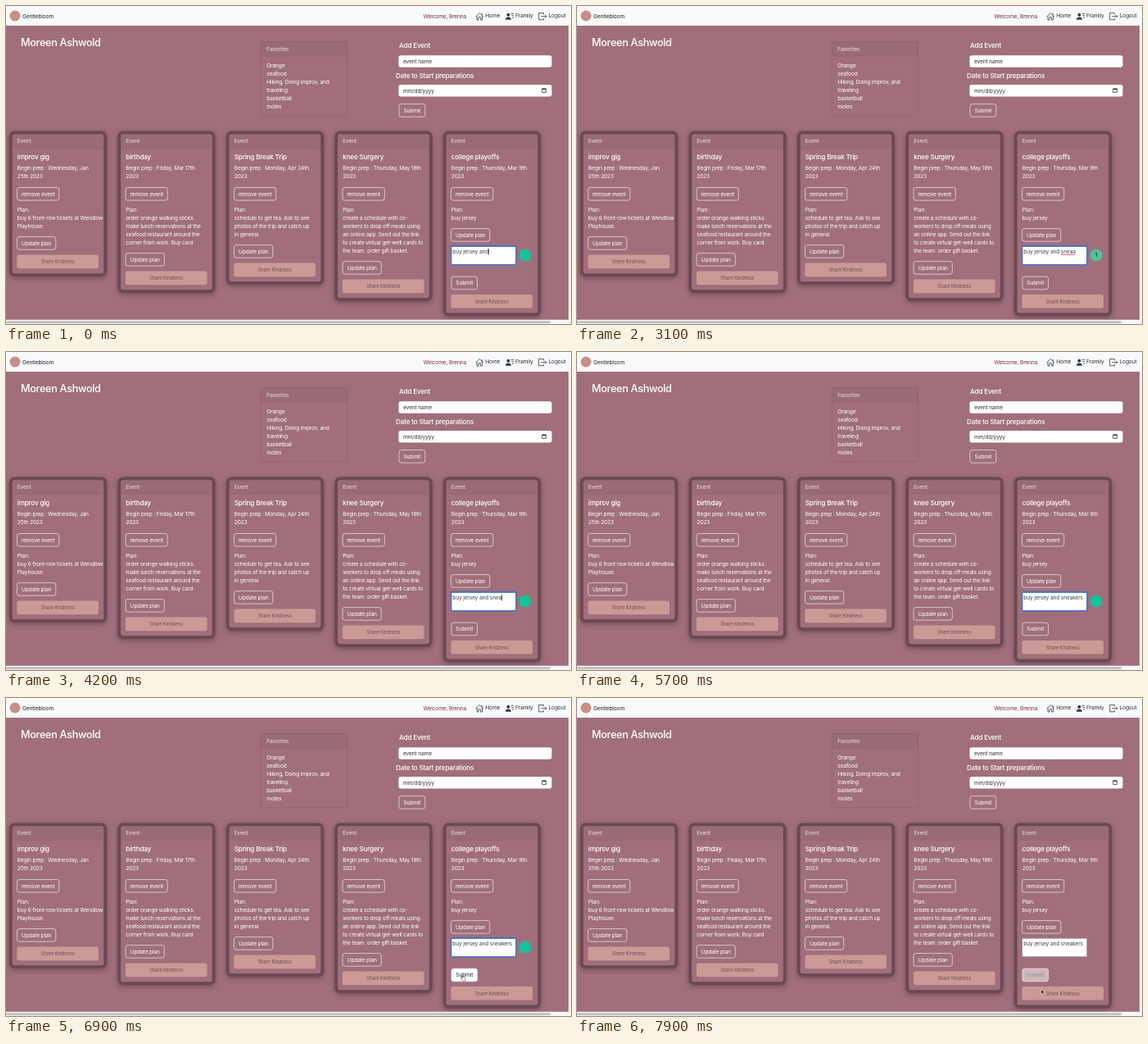
An HTML page that plays this animation: 690x388 px, repeating every 8000 ms.

```html
<!DOCTYPE html>
<html lang="en">
<head>
<meta charset="utf-8">
<title>Event planner</title>
<style>
  html, body { margin: 0; width: 100%; height: 100%; overflow: hidden; background: #a06f7b; }
  svg { display: block; width: 690px; height: 388px; }
  text { font-family: Inter, "Liberation Sans", sans-serif; letter-spacing: -.026em; }
  .shadow { filter: drop-shadow(0 2px 3px rgba(40, 15, 25, .4)); }
</style>
</head>
<body>
<svg id="stage" viewBox="0 0 690 388"></svg>
<script>
const stage = document.getElementById('stage');
const BODY = 6.67, DARK = '#30343a', EDGE = '#6a4852', BACK = '#a06f7b';

function add(tag, attrs, parent = stage) {
  const el = document.createElementNS('http://www.w3.org/2000/svg', tag);
  for (const key in attrs) el.setAttribute(key, attrs[key]);
  return parent.appendChild(el);
}
const rect = (x, y, width, height, fill, more) => add('rect', { x, y, width, height, fill, ...more });
const path = (d, more, parent) => add('path', { d, fill: 'none', stroke: '#343a40', 'stroke-width': .8, ...more }, parent);

// y is the middle of the capital letters
function text(x, y, content, { size = BODY, fill = '#fff', ...more } = {}) {
  const el = add('text', { x, y: y + size * .36, 'font-size': size, fill, ...more });
  el.textContent = content;
  return el;
}
const heading = (x, y, content, size = 8.2) => text(x, y, content, { size, 'font-weight': 500 });

function button(x, cy, width, label) {
  const box = rect(x, cy - 7.8, width, 15.6, '#fff', { 'fill-opacity': 0, rx: 2.6, stroke: '#fff', 'stroke-width': .6 });
  return { box, label: text(x + width / 2, cy, label, { 'text-anchor': 'middle' }) };
}

function navbar() {
  rect(0, 0, 690, 24, '#f8f9fa');
  add('circle', { cx: 11, cy: 12, r: 6.5, fill: '#c98f88' });
  text(20, 12.2, 'Gentlebloom', { fill: '#212529' });
  text(509.5, 12.2, 'Welcome, Brenna', { fill: '#7c2d48' });
  text(585.3, 12, 'Home', { fill: DARK });
  text(622, 12, 'Framily', { fill: DARK });
  text(662.5, 12, 'Logout', { fill: DARK });
  path('M573.7 13 578.3 8.4 582.9 13M575 12V17H577V13.7H579.6V17H581.6V12M581.3 9V11');
  add('circle', { cx: 613.4, cy: 10.7, r: 2, fill: '#343a40' });
  path('M610 16.7Q610 13.4 613.4 13.4T616.8 16.7Z', { fill: '#343a40', stroke: 'none' });
  path('M616.6 9.3H620M617.3 11.6H620M618 14H620');
  path('M656.5 10.3V8.5H650.7V16.8H656.5V15M653.5 12.6H660M658 10.6 660 12.6 658 14.6');
}

function favorites() {
  rect(311.3, 43.3, 105.4, 90.5, 'none', { rx: 2, stroke: '#8b5d69', 'stroke-width': .6 });
  rect(311.3, 43.3, 105.4, 17.7, '#000', { 'fill-opacity': .04 });
  path('M311.3 61H416.7', { stroke: '#8b5d69', 'stroke-width': .5 });
  text(318.3, 52.2, 'Favorites', { fill: '#eadde0' });
  ['Orange', 'seafood', 'Hiking, Doing improv, and', 'traveling', 'basketball', 'moles']
    .forEach((line, i) => text(318.3, 72.3 + i * 10, line));
}

function eventForm() {
  heading(480, 48.5, 'Add Event');
  rect(479.5, 60.3, 187, 14.4, '#fff', { rx: 2.6 });
  text(485, 67.8, 'event name', { fill: DARK });
  heading(476, 85.5, 'Date to Start preparations');
  rect(479.5, 96, 187, 14.4, '#fff', { rx: 2.6 });
  text(485, 103.3, 'mm/dd/yyyy', { fill: DARK });
  rect(654.8, 101, 4.6, 4.5, 'none', { stroke: '#222', 'stroke-width': .7 });
  path('M654.8 101.5H659.4M656 100V101M658.2 100V101', { stroke: '#222' });
  button(480, 127.4, 31.8, 'Submit');
}

const cards = [
  ['improv gig', 'Wednesday, Jan', '25th 2023', ['buy 6 front-row tickets at Wendlow', 'Playhouse.']],
  ['birthday', 'Friday, Mar 17th', '2023', ['order orange walking sticks.', 'make lunch reservations at the', 'seafood restaurant around the', 'corner from work. Buy card']],
  ['Spring Break Trip', 'Monday, Apr 24th', '2023', ['schedule to get tea. Ask to see', 'photos of the trip and catch up', 'in general.']],
  ['knee Surgery', 'Thursday, May 18th', '2023', ['create a schedule with co-', 'workers to drop off meals using', 'an online app. Send out the link', 'to create virtual get-well cards to', 'the team. order gift basket.']],
  ['college playoffs', 'Thursday, Mar 9th', '2023', ['buy jersey']]
];

function card([title, day, rest, plan], i) {
  const left = 4 + i * 132.5, x = left + 9.8;
  const updateY = 269.4 + plan.length * 10;
  const shareY = i === 4 ? 360.3 : updateY + 22.5;
  rect(left + 1.8, 154.3, 115.4, shareY - 138.2, BACK, { rx: 4.5, stroke: EDGE, 'stroke-width': 3.7, class: 'shadow' });
  rect(left + 3.6, 156, 111.8, 17.2, '#000', { 'fill-opacity': .035 });
  path(`M${left + 3.6} 173.3h111.8`, { stroke: '#8b5d69', 'stroke-width': .5 });
  text(x, 164.3, 'Event', { fill: '#eadde0' });
  heading(x, 184.5, title);
  text(x, 198, 'Begin prep : ' + day);
  text(x, 208, rest);
  button(x - .2, 229.3, 51.2, 'remove event');
  text(x, 248.2, 'Plan:');
  plan.forEach((line, n) => text(x, 258.2 + n * 10, line));
  button(x - .2, updateY, 47.2, 'Update plan');
  rect(x - .4, shareY - 8.3, 99.6, 16.6, '#cb9a96', { rx: 2.5 });
  text(x + 49.4, shareY + .2, 'Share Kindness', { size: 5.83, fill: '#6f5057', 'text-anchor': 'middle' });
}

rect(0, 0, 690, 388, BACK);
navbar();
heading(18, 44, 'Moreen Ashwold', 12.7);
favorites();
eventForm();
cards.forEach(card);
rect(687, 24, 3, 364, '#f8f8f8');
rect(0, 382.8, 690, 5.2, '#f8f8f8');
rect(0, 384.3, 665, 3, '#c1c1c1', { rx: 1.5 });

// Plan editor
rect(543.8, 293.2, 79, 22.4, '#fff', { stroke: '#777', 'stroke-width': .4 });
path('M619 314.8 622 311.8M620.8 314.8 622 313.6', { stroke: '#888', 'stroke-width': .4 });
const focusRing = rect(543.7, 293, 79.3, 22.8, 'none', { rx: 1, stroke: '#2f6fd6', 'stroke-width': 1.3 });
const entry = text(545.3, 299.6, '', { fill: '#41454a' });
const caret = rect(0, 296, .7, 7.5, '#111');
const underline = rect(591, 303.1, 17, .8, '#d8404f');
const badge = add('circle', { cx: 634, cy: 304, r: 7.5, fill: '#15c39a' });
const badgeCount = text(634, 304.2, '1', { size: 6, fill: '#143c34', 'text-anchor': 'middle', 'font-weight': 600 });
const submit = button(544, 338, 31.6, 'Submit');

// Pointers, both with their hot spot at 0,0
const outline = { fill: '#111', stroke: '#fff', 'stroke-width': .45, 'stroke-linejoin': 'round' };
const arrow = path('M0 0V5.5L1.3 4.3 2.2 6.4 3.2 6 2.3 3.9H4Z', outline);
const hand = path('M-.6 .3Q0-.5 .6 .3V2.5L3 3.1Q3.6 3.3 3.4 4.2L2.8 6.7H-.4L-2.3 4.1Q-2-.1-.6 3.8Z', { ...outline, fill: '#fff', stroke: '#111' });

const typing = [[0, ''], [800, ' s'], [1300, ' sn'], [1500, ' sne'], [1800, ' snea'], [2000, ' sneaa'],
  [2200, ' sneaak'], [3000, ' sneaa'], [3200, ' snea'], [4400, ' sneak'], [4700, ' sneake'],
  [4900, ' sneaker'], [5200, ' sneakers']];
const caretOn = [[0, 100], [600, 2700], [3200, 3700], [4200, 5700], [6200, 6700]];
const route = [[6200, 587, 355], [6500, 583.5, 349.5], [6700, 571, 342], [6900, 558, 338.3], [7000, 557, 338],
  [7600, 557, 338], [7700, 558.5, 340], [7800, 562, 346], [7900, 567, 355.7], [8000, 567, 355.7]];

const ramp = (t, start, length) => Math.min(1, Math.max(0, (t - start) / length));
const within = (t, a, b) => t >= a && t < b;
const show = (el, visible) => el.setAttribute('opacity', +visible);

function pointerAt(t) {
  const i = Math.max(1, route.findIndex(p => p[0] > t));
  const [t0, x0, y0] = route[i - 1], [t1, x1, y1] = route[i];
  const k = ramp(t, t0, t1 - t0);
  return [x0 + (x1 - x0) * k, y0 + (y1 - y0) * k];
}

function draw(t) {
  entry.textContent = 'buy jersey and' + typing.filter(k => k[0] <= t).pop()[1];
  caret.setAttribute('x', 545.4 + entry.getComputedTextLength());
  show(caret, caretOn.some(([a, b]) => within(t, a, b)));
  show(underline, within(t, 3000, 3200));
  badge.setAttribute('fill', within(t, 3000, 3500) ? '#55c09c' : '#15c39a');
  show(badgeCount, within(t, 3000, 3500));

  const focus = 1 - ramp(t, 7000, 300);
  show(focusRing, focus);
  show(badge, focus);

  const hover = ramp(t, 6650, 150) * (1 - ramp(t, 7800, 200));
  const mix = (from, to) => Math.round(from + (to - from) * hover);
  submit.box.setAttribute('fill-opacity', hover);
  submit.label.setAttribute('fill', `rgb(${mix(255, 33)},${mix(255, 37)},${mix(255, 41)})`);

  const [x, y] = pointerAt(t), over = within(t, 6700, 7800);
  for (const el of [arrow, hand]) el.setAttribute('transform', `translate(${x} ${y})`);
  show(arrow, t >= 6200 && !over);
  show(hand, over);
}

const start = performance.now();
function tick(now) {
  const t = Math.max(0, now - start) % 8000;
  draw(Math.floor(t / 100) * 100);
  requestAnimationFrame(tick);
}
tick(start);
</script>
</body>
</html>
```
